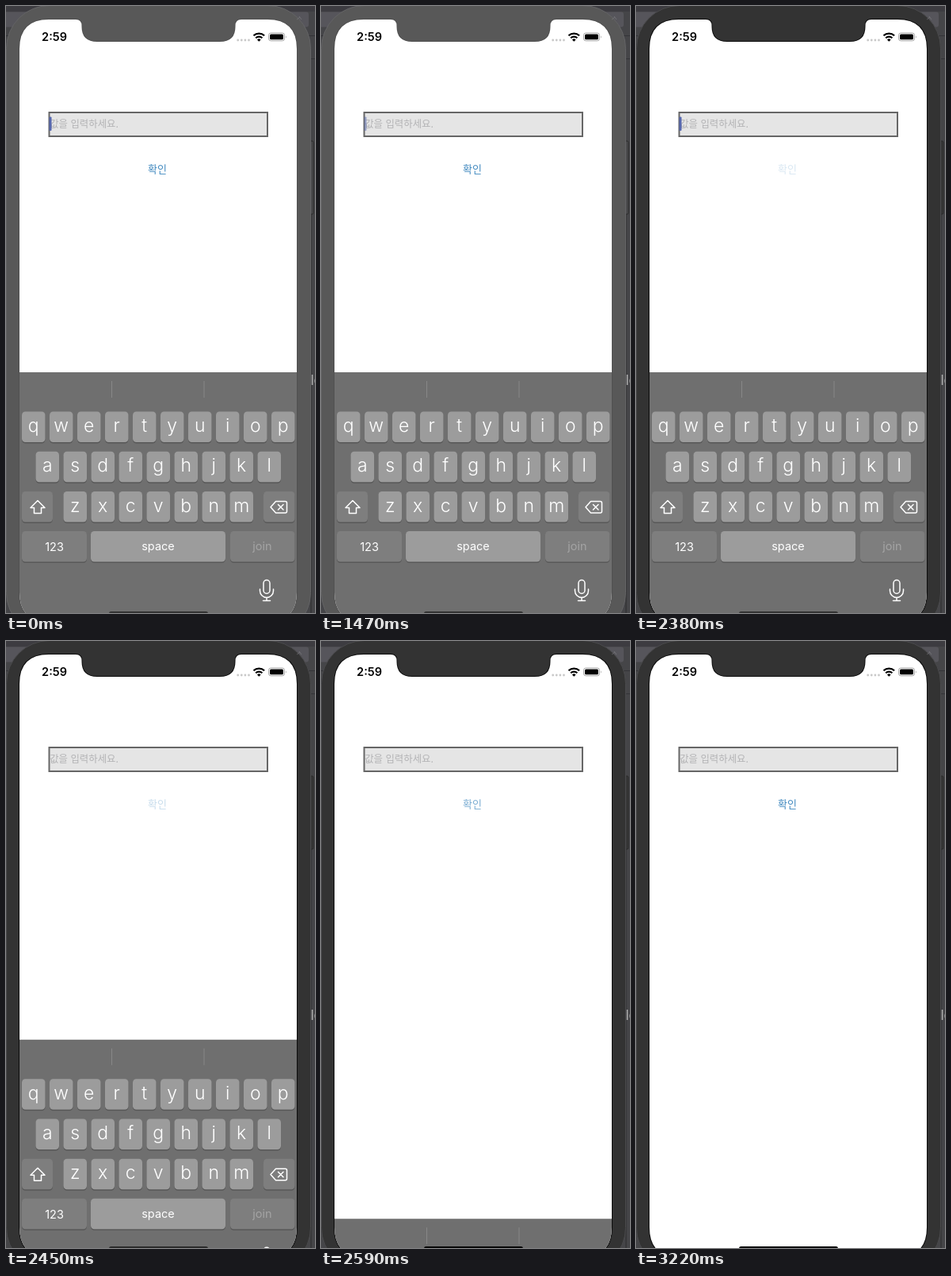
Recreate the animation shown at these times as an HTML page. Size 390x764 px, loop 4.06 s.

```html
<!DOCTYPE html>
<html lang="ko">
<head>
<meta charset="utf-8">
<title>Keyboard dismiss</title>
<style>
html, body { margin: 0; width: 100%; height: 100%; overflow: hidden; background: #454548; }
svg { display: block; width: 390px; height: 764px; }
text { font-family: Inter, Roboto, sans-serif; }
.ko { font-family: "Noto Sans CJK KR", "Noto Sans CJK JP", "Noto Sans CJK", sans-serif; }
.key { font-size: 23px; font-weight: 300; }
.word { font-size: 14.5px; }
.icon { fill: none; stroke: #fff; stroke-width: 1.5; stroke-linejoin: round; stroke-linecap: round; }
</style>
</head>
<body>
<svg viewBox="0 0 390 764">
  <defs>
    <path id="shape" d="M54 17H88Q95.500 17 95.500 25V26Q95.500 45 115 45H270Q289.500 45 289.500 26V25Q289.500 17 297 17H330Q367 17 367 54V738Q367 775 330 775H54Q17 775 17 738V54Q17 17 54 17Z"/>
    <clipPath id="screen"><use href="#shape"/></clipPath>
  </defs>

  <!-- desktop behind the phone -->
  <rect width="390" height="764" fill="#454548"/>
  <rect width="390" height="7" fill="#3d3c41"/>
  <rect x="-9" y="7.500" width="391" height="19" rx="3" fill="#56555b"/>
  <path d="M0 37.500H390M384 66.500H390" stroke="#343438"/>
  <path d="M0 112V140M0 184V235M0 238V288" stroke="#29292b" stroke-width="2"/>
  <path d="M385 262V764" stroke="#38383a" stroke-width="2"/>
  <text x="384.500" y="477" font-size="17" fill="#b4b4b4">le</text>

  <rect id="side" x="381" y="170" width="7" height="92" rx="1.500" stroke="#2a2a2a"/>
  <rect id="body" x="0.500" y="-0.500" width="384" height="793" rx="54"/>
  <path d="M367 17l4-3M370 13l3 4" stroke="#8a8a8e" opacity=".5"/>
  <use id="rim" href="#shape" fill="none" stroke-width="2"/>
  <use href="#shape" fill="#fff"/>

  <!-- status bar -->
  <text x="61" y="44" font-size="14.500" font-weight="600" text-anchor="middle">2:59</text>
  <g fill="#c9c9c9">
    <circle cx="292.700" cy="43" r="1.400"/><circle cx="297.300" cy="43" r="1.400"/>
    <circle cx="301.900" cy="43" r="1.400"/><circle cx="306.500" cy="43" r="1.400"/>
  </g>
  <g fill="none" stroke="#000" stroke-width="2.200">
    <path d="M312.500 37.300a9.800 9.800 0 0 1 13.600 0M315.200 40.200a5.900 5.900 0 0 1 8.200 0"/>
    <path d="M319.300 44.800l-2.300-2.400a3.300 3.300 0 0 1 4.600 0z" fill="#000" stroke="none"/>
  </g>
  <rect x="331.500" y="34" width="20" height="9.800" rx="2.800" fill="none" stroke="#a5a5a5"/>
  <rect x="333" y="35.500" width="17" height="6.800" rx="1.500"/>
  <path d="M353 37.200q1.800 1.700 0 3.400z" fill="#a5a5a5"/>

  <!-- form -->
  <rect x="54.500" y="134" width="275.500" height="30" fill="#e5e5e5" stroke="#666" stroke-width="2"/>
  <text class="ko" x="55.200" y="152.800" font-size="12.400" fill="#b3b3b5">값을 입력하세요.</text>
  <rect id="caret" x="54.500" y="139.500" width="3" height="17.500" rx="1" fill="#5667ad"/>
  <text id="button" class="ko" x="191" y="210" font-size="13" fill="#4189bf" text-anchor="middle">확인</text>

  <g clip-path="url(#screen)">
    <g id="keyboard" fill="#fff" text-anchor="middle"></g>
    <rect id="home" x="130" y="762" width="125" height="5" rx="2.500"/>
  </g>
</svg>
<script>
const LOOP = 4060, STEP = 70, TRAVEL = 314;
const $ = id => document.getElementById(id);
const set = (id, name, value) => $(id).setAttribute(name, value);
const ramp = (t, a, b) => Math.min(1, Math.max(0, (t - a) / (b - a)));

const cap = (x, y, w, fill) =>
  `<rect x="${x}" y="${y + 1}" width="${w}" height="39" rx="4.5" fill="#585858"/>` +
  `<rect x="${x}" y="${y}" width="${w}" height="38.5" rx="4.5" fill="${fill}"/>`;
const label = (x, y, cls, s, fill = '#fff') =>
  `<text class="${cls}" x="${x}" y="${y}" fill="${fill}">${s}</text>`;
const icon = d => `<path class="icon" d="${d}"/>`;

function buildKeyboard() {
  const light = '#9c9c9c', dim = '#7e7e7e';
  let out = '<rect x="17" y="461" width="350" height="320" fill="#6f6f6f"/>' +
    '<path d="M133.500 472V493M250 472V493" stroke="#888"/>';
  const rows = [['qwertyuiop', 20, 510.5], ['asdfghjkl', 37.5, 560.7], ['zxcvbnm', 72.5, 611]];
  for (const [letters, x0, y] of rows)
    [...letters].forEach((c, i) => {
      const x = x0 + 35 * i;
      out += cap(x, y, 29.5, light) + label(x + 14.7, y + 25.5, 'key', c);
    });
  out += cap(20, 611, 39, dim) + cap(325, 611, 39.5, dim);
  out += cap(20, 661, 82, dim) + cap(107, 661, 170, light) + cap(283, 661, 81.5, dim);
  out += label(61, 686, 'word', '123') + label(192, 685, 'word', 'space') +
    label(323.5, 685, 'word', 'join', '#a4a4a4');
  out += icon('M40 622.500L49 631.500H44.500V638.500H35.500V631.500H31Z');
  out += icon('M340.500 623.500H352.500Q354.500 623.500 354.500 625.500V636Q354.500 638 352.500 638H340.500L334 630.800Z' +
    'M343.500 627.500L350 634M350 627.500L343.500 634');
  out += '<rect class="icon" x="325" y="722.500" width="8" height="17" rx="4"/>' +
    icon('M320.500 734V736A8.500 8.500 0 0 0 337.500 736V734M329 744.500V748.500M324.500 748.500H333.500');
  $('keyboard').innerHTML = out;
}

function caretAlpha(t) {
  if (t >= 2450) return 0;
  return 1 - ramp(t, 350, 560) + ramp(t, 840, 1120) - ramp(t, 1330, 1610) + ramp(t, 1890, 2170);
}

function buttonAlpha(t) {
  return t < 2310 ? 1 : 0.2 + 0.8 * ramp(t, 2420, 2690);
}

// critically damped spring
function slide(t) {
  const x = Math.max(0, t - 2418) * 0.0195;
  return 1 - (1 + x) * Math.exp(-x);
}

function draw(time) {
  const t = Math.floor(time % LOOP / STEP) * STEP;
  const active = t >= 2240, p = slide(t);
  set('body', 'fill', active ? '#333' : '#585858');
  set('body', 'stroke', active ? '#4b4b4d' : '#636365');
  set('side', 'fill', active ? '#363637' : '#4a4a4c');
  set('rim', 'stroke', active ? '#0c0c0c' : '#505050');
  set('caret', 'opacity', caretAlpha(t));
  set('button', 'opacity', buttonAlpha(t));
  set('keyboard', 'transform', `translate(0 ${(TRAVEL * p).toFixed(2)})`);
  set('keyboard', 'visibility', p * TRAVEL > 303 ? 'hidden' : 'visible');
  set('home', 'opacity', 0.55 + 0.45 * p);
}

buildKeyboard();
const start = performance.now();
function tick() {
  draw(performance.now() - start);
  requestAnimationFrame(tick);
}
tick();
</script>
</body>
</html>
```
